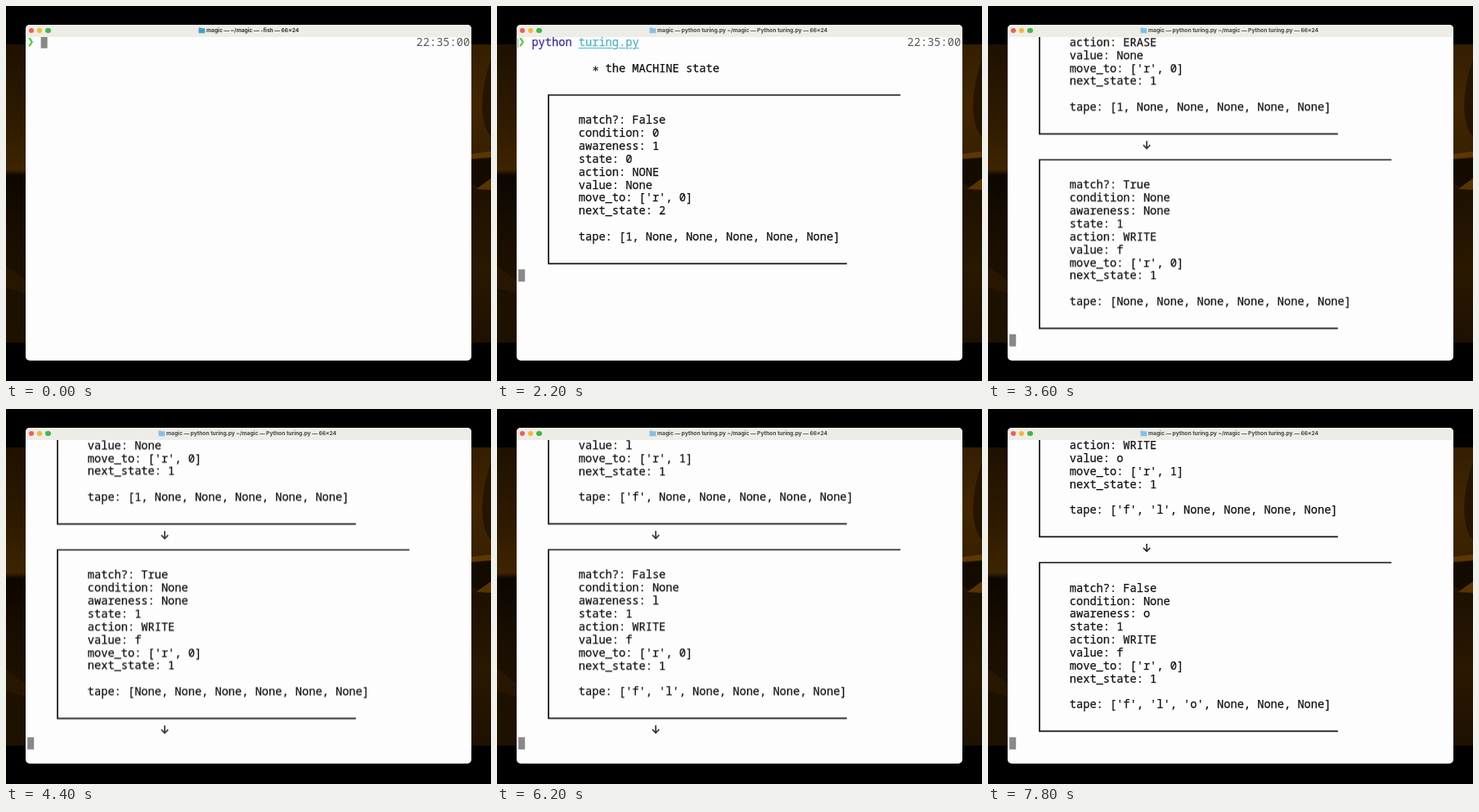
Recreate the animation shown at these times as an HTML page. Size 593 by 459 pixels, loop 8 s.

```html
<!DOCTYPE html>
<html lang="en">
<head>
<meta charset="utf-8">
<title>Turing machine in a terminal</title>
<style>
  html, body { margin: 0; width: 100%; height: 100%; overflow: hidden; background: #000; }
  #stage { position: relative; width: 593px; height: 459px; overflow: hidden; }
  #stage div, #stage span, #stage svg { position: absolute; }
  #window {
    left: 24px; top: 23px; width: 545px; height: 411px;
    border-radius: 5px; background: #fdfdfd; overflow: hidden;
  }
  #bar { left: 0; top: 0; width: 545px; height: 15px; background: #edece6; }
  .light { top: 3.8px; width: 6.4px; height: 6.4px; border-radius: 50%; }
  .title {
    top: 0; white-space: pre;
    font: 700 6.65px/14px Inter, "Open Sans", sans-serif;
  }
  .title svg { left: -10px; top: 3.2px; }
  #view { left: 0; top: 15px; width: 545px; height: 396px; overflow: hidden; }
  #log { left: 2px; top: -0.8px; }
  #log span {
    white-space: pre; color: #111; margin-top: -1.2px;
    font: 13.67px/15.87px "Noto Sans Mono", "DejaVu Sans Mono", monospace;
    -webkit-text-stroke: 0.25px currentColor;
  }
  #log .prompt { color: #45c92f; font-weight: bold; font-family: "DejaVu Sans Mono", monospace; }
  #log .command { color: #3a2fa8; }
  #log .path { color: #4db5c3; text-decoration: underline; text-underline-offset: 2px; }
  #log .clock { color: #5a5a5a; -webkit-text-stroke: 0; }
  #log .arrow {
    width: 16.4px; margin-left: -4.1px; text-align: center;
    font-family: Inter, "DejaVu Sans", sans-serif; font-weight: 500;
  }
  .mark { top: 2.5px; width: 1px; height: 11px; background: #999; }
  .box { overflow: visible; fill: none; stroke: #111; stroke-width: 1.7; }
  #cursor { width: 8px; height: 15px; background: #888; }
</style>
</head>
<body>
<div id="stage">
  <svg width="593" height="459">
    <defs>
      <linearGradient id="left" x2="0" y2="1">
        <stop offset="0" stop-color="#1e1100"/>
        <stop offset=".25" stop-color="#2e1a00"/>
        <stop offset=".42" stop-color="#3e2400"/>
        <stop offset=".44" stop-color="#0c0600"/>
        <stop offset=".58" stop-color="#160c00"/>
        <stop offset=".75" stop-color="#1c1000"/>
        <stop offset="1" stop-color="#1e1100"/>
      </linearGradient>
      <linearGradient id="right" x2="0" y2="1">
        <stop offset="0" stop-color="#341e00"/>
        <stop offset=".2" stop-color="#422600"/>
        <stop offset=".36" stop-color="#382000"/>
        <stop offset=".5" stop-color="#1e1100"/>
        <stop offset=".75" stop-color="#2a1800"/>
        <stop offset="1" stop-color="#1e1100"/>
      </linearGradient>
    </defs>
    <rect y="47" width="30" height="365" fill="url(#left)"/>
    <path d="M0 318L24 336V352L0 345Z" fill="#281700"/>
    <rect x="563" y="47" width="30" height="365" fill="url(#right)"/>
    <path d="M593 66Q583 92 582 122Q583 150 593 160Z" fill="#241400"/>
    <path d="M569 181L593 178V185L569 187Z" fill="#5c3702"/>
    <path d="M569 188L593 186V211L577 222L569 216Z" fill="#140b00"/>
    <path d="M575 224L593 211V225Z" fill="#583402"/>
  </svg>
  <div id="window">
    <div id="bar"></div>
    <div id="view"><div id="log"></div></div>
  </div>
</div>
<script>
const LOOP = 8000, COL = 8.2, ROW = 15.87, LAST_ROW = 23;
const RUN = 2150;
const bar = document.getElementById('bar');
const log = document.getElementById('log');

// Stepped animation from a table of [time, style] pairs.
function play(el, steps) {
  const frames = steps.map(([time, style]) => ({ ...style, offset: time / LOOP, easing: 'step-end' }));
  frames.push({ ...steps[steps.length - 1][1], offset: 1 });
  el.animate(frames, { duration: LOOP, iterations: Infinity });
}

function reveal(el, at) {
  if (at > 0) play(el, [[0, { opacity: 0 }], [at, { opacity: 1 }]]);
}

function add(parent, tag, className, style = {}, text = '') {
  const el = document.createElement(tag);
  el.className = className;
  el.textContent = text;
  Object.assign(el.style, style);
  return parent.appendChild(el);
}

function print(text, col, row, at = 0, className = '') {
  const style = { left: col * COL + 'px', top: row * ROW + 'px' };
  reveal(add(log, 'span', className, style, text), at);
}

function drawBox(row, at) {
  const holder = add(log, 'div', '', { left: '37.2px', top: row * ROW + 8.3 + 'px' });
  holder.innerHTML = `<svg class="box" width="1" height="1"><path d="M430.3 0H0V${13 * ROW}H364.8"/></svg>`;
  reveal(holder, at);
}

function title(text, left, color, ink) {
  const el = add(bar, 'div', 'title', { left: left + 'px', color: ink }, text);
  el.insertAdjacentHTML('beforeend',
    `<svg width="9" height="8"><path d="M.5 1.2Q.5 .4 1.2 .4H3.2L4 1.2H7.6Q8.3 1.2 8.3 2V6.6Q8.3 7.3 7.6 7.3H1.2Q.5 7.3 .5 6.6Z" fill="${color}"/></svg>`);
  return el;
}

// Title bar
['#ec5f56', '#f1b934', '#3eb945'].forEach((background, i) =>
  add(bar, 'div', 'light', { left: 3.7 + i * 10.3 + 'px', background }));
play(title('magic — ~/magic — -fish — 66×24', 221, '#409fc4', '#333'),
  [[0, { opacity: 1 }], [RUN, { opacity: 0 }]]);
reveal(title('magic — python turing.py ~/magic — Python turing.py — 66×24', 172, '#86bfe6', '#444'), RUN);

// Command line
const cursorSteps = [[0, 2, 0]];
print('❯', 0, 0, 0, 'prompt');
print('22:35:00', 58, 0, 0, 'clock');
[...'python turing.py'].forEach((char, i) => {
  const at = 190 + i * 106;
  if (char !== ' ') print(char, 2 + i, 0, at, i < 6 ? 'command' : 'path');
  cursorSteps.push([at, 3 + i, 0]);
});
for (const left of [-1.5, 542.5]) reveal(add(log, 'div', 'mark', { left: left + 'px' }), RUN);

// Machine run: condition, awareness, state, action, value, move, next state, tape
const None = 'None';
const runs = [
  [0, 1, 0, 'NONE', None, 0, 2, [1]],
  [1, 1, 0, 'ERASE', None, 0, 1, [1]],
  [None, None, 1, 'WRITE', 'f', 0, 1, []],
  [None, 'f', 1, 'WRITE', 'f', 0, 1, ['f']],
  ['f', 'f', 1, 'WRITE', 'l', 1, 1, ['f']],
  [None, 'l', 1, 'WRITE', 'f', 0, 1, ['f', 'l']],
  ['f', 'l', 1, 'WRITE', 'l', 1, 1, ['f', 'l']],
  ['l', 'l', 1, 'WRITE', 'o', 1, 1, ['f', 'l']],
  [None, 'o', 1, 'WRITE', 'f', 0, 1, ['f', 'l', 'o']],
];

function printState([condition, awareness, state, action, value, move, next, cells], row, at) {
  const tape = Array.from({ length: 6 }, (_, i) =>
    i >= cells.length ? None : typeof cells[i] === 'string' ? `'${cells[i]}'` : cells[i]);
  [
    `match?: ${condition === awareness ? 'True' : 'False'}`,
    `condition: ${condition}`,
    `awareness: ${awareness}`,
    `state: ${state}`,
    `action: ${action}`,
    `value: ${value}`,
    `move_to: ['r', ${move}]`,
    `next_state: ${next}`,
    '',
    `tape: [${tape.join(', ')}]`,
  ].forEach((text, i) => text && print(text, 9, row + 2 + i, at));
  drawBox(row, at);
}

print('∗', 11, 2, RUN);
print('the MACHINE state', 13, 2, RUN);
let row = 4, at = RUN;
runs.forEach((run, i) => {
  printState(run, row, at);
  row += 14;
  cursorSteps.push([at, 0, row]);
  at += run[0] === run[1] ? 1000 : 400;
  if (i < runs.length - 1) {
    print('↓', 20, row, at - 200, 'arrow');
    row += 1;
    cursorSteps.push([at - 200, 0, row]);
  }
});

// Cursor, and the log scrolling to keep it on the last row
const cursor = add(log, 'div', '');
cursor.id = 'cursor';
const shift = (x, y) => ({ transform: `translate(${x}px, ${y}px)` });
play(cursor, cursorSteps.map(([time, col, r]) => [time, shift(col * COL + 0.2, r * ROW - 0.3)]));
play(log, cursorSteps.map(([time, , r]) => [time, shift(0, -Math.max(0, r - LAST_ROW) * ROW)]));
</script>
</body>
</html>
```
